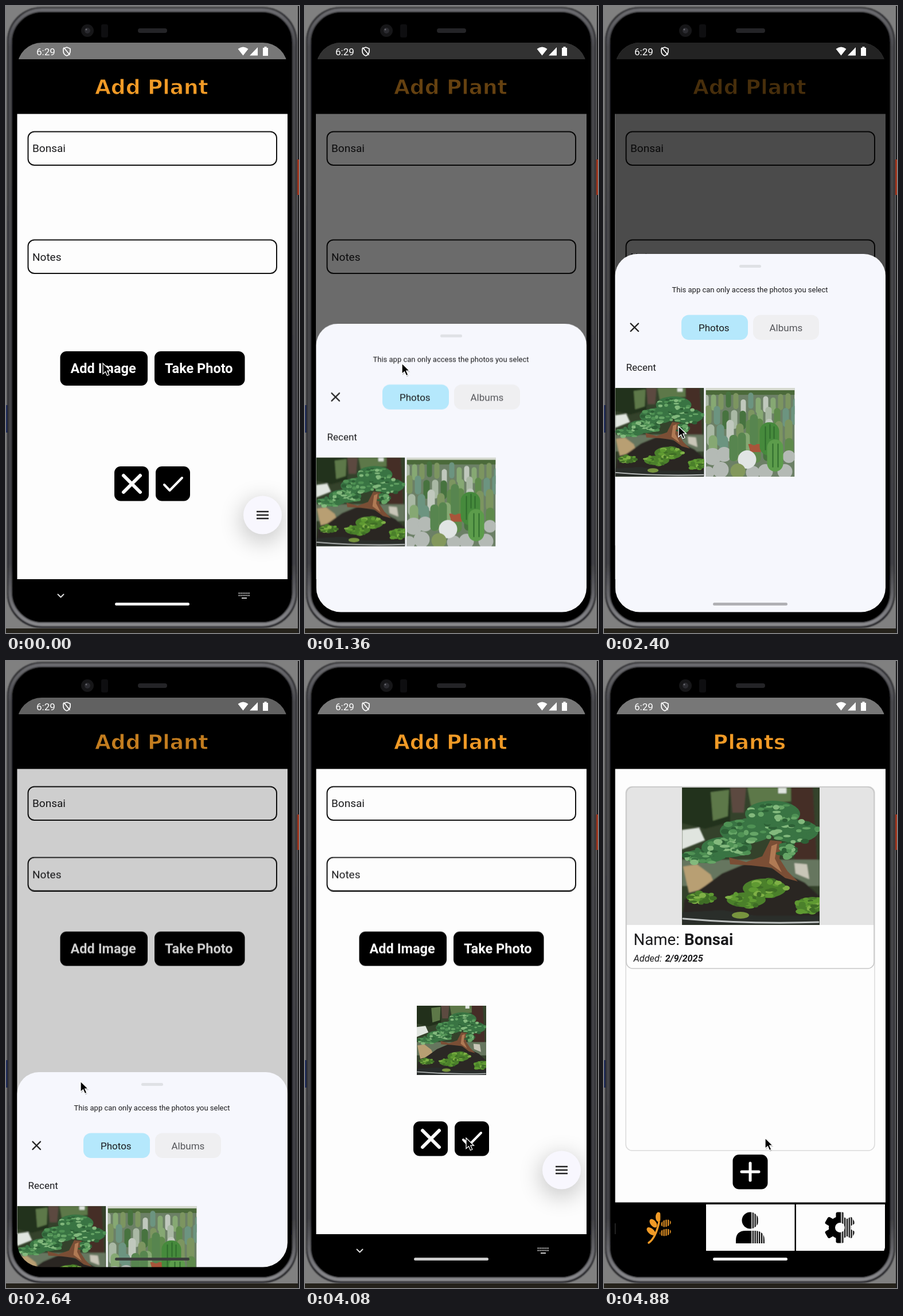
Animation, 511 px wide and 1095 px high, one loop 4960 ms. Source, as an HTML page:

```html
<!DOCTYPE html>
<html lang="en">
<head>
<meta charset="utf-8">
<title>Add a plant</title>
<style>
html, body { margin: 0; width: 100%; height: 100%; overflow: hidden; background: #808080; }
svg.stage { display: block; width: 511px; height: 1095px; }
text { font-family: Roboto, sans-serif; font-size: 19px; fill: #1b1b1d; }
.title { font: bold 36px "DejaVu Sans", sans-serif; fill: #f09a26; stroke: #000; stroke-width: 1px; }
.button { font-size: 23.5px; font-weight: 700; fill: #fff; }
.small { font-size: 13px; }
.mid { font-size: 17px; }
.large { font-size: 27.7px; }
.bold { font-weight: 700; }
.italic { font-style: italic; font-size: 16.3px; }
.white { fill: #fff; }
.grey { fill: #55565a; }
.field { fill: #fdfdfd; stroke: #111; stroke-width: 2; }
.line { fill: none; stroke-linecap: round; stroke-linejoin: round; }

.cursor, .sheet, .dim, .pill, .notes, .buttons, .picked, .form, .list, .cardphoto { animation: 4960ms linear infinite; }

.cursor { animation-name: cursor; }
@keyframes cursor {
  0%, 30.6% { transform: translate(169px, 624px); animation-timing-function: ease-in-out; }
  38.71% { transform: translate(188px, 692px); animation-timing-function: ease-out; }
  45%, 56.5% { transform: translate(130px, 734px); animation-timing-function: ease-in-out; }
  66.13% { transform: translate(174px, 777px); animation-timing-function: ease-in-out; }
  77.42%, 100% { transform: translate(281px, 833px); }
}
.sheet { animation-name: sheet; }
@keyframes sheet {
  0%, 24.15% { transform: translateY(628px); animation-timing-function: cubic-bezier(0, 0, .2, 1); }
  31.34%, 50.32% { transform: translateY(0); }
  56.77%, 100% { transform: translateY(628px); }
}
.dim { animation-name: dim; }
@keyframes dim {
  0%, 24.15% { opacity: 0; animation-timing-function: cubic-bezier(0, 0, .2, 1); }
  31%, 50% { opacity: .7; }
  54.44%, 100% { opacity: 0; }
}
.pill { animation-name: pill; animation-timing-function: step-end; }
@keyframes pill {
  0% { fill: #f2f2f2; }
  24.19% { fill: #f6f7fd00; }
  30.6% { fill: #b0b0b4; }
  50.3% { fill: #3c3f3c; }
  56.4% { fill: #cbcbcb; }
  83.06%, 100% { fill: #f6f6f6; }
}
.notes { animation-name: notes; animation-timing-function: step-end; }
@keyframes notes { 0% { transform: none; } 49.19%, 100% { transform: translateY(-65.5px); } }
.buttons { animation-name: buttons; animation-timing-function: step-end; }
@keyframes buttons { 0% { transform: none; } 49.19%, 100% { transform: translateY(-130.5px); } }
.picked { animation-name: picked; }
@keyframes picked { 0%, 54.84% { opacity: 0; } 60.89%, 100% { opacity: 1; } }
.form { animation-name: form; animation-timing-function: step-end; }
@keyframes form { 0% { visibility: visible; } 83.06%, 100% { visibility: hidden; } }
.list { animation-name: list; animation-timing-function: step-end; }
@keyframes list { 0% { visibility: hidden; } 83.06%, 100% { visibility: visible; } }
.cardphoto { animation-name: cardphoto; }
@keyframes cardphoto { 0%, 83.57% { opacity: 0; } 89.62%, 100% { opacity: 1; } }
</style>
</head>
<body>
<svg class="stage" viewBox="0 0 511 1095">
  <defs>
    <clipPath id="screen"><rect x="19.500" y="64" width="471.500" height="994.500" rx="43"/></clipPath>
    <linearGradient id="rim" x2="0" y2="1">
      <stop offset="0" stop-color="#6c6c70"/><stop offset=".06" stop-color="#4a4a4e"/>
      <stop offset=".9" stop-color="#424246"/><stop offset="1" stop-color="#8a8a8e"/>
    </linearGradient>
    <filter id="blend"><feGaussianBlur stdDeviation="1.300"/></filter>
    <filter id="soft" x="-60%" y="-60%" width="220%" height="220%"><feGaussianBlur stdDeviation="19"/></filter>
    <pattern id="bars" width="3.800" height="10" patternUnits="userSpaceOnUse">
      <rect width="2.200" height="10" fill="#fff"/>
    </pattern>
    <mask id="half" maskUnits="userSpaceOnUse" x="-32" y="-32" width="64" height="64">
      <rect x="-32" y="-32" width="33" height="64" fill="#fff"/>
      <rect x="1" y="-32" width="31" height="64" fill="url(#bars)"/>
    </mask>

    <symbol id="bonsai" viewBox="0 0 240 240">
      <path fill="#34422b" d="M0 0H240V240H0Z"/>
      <g filter="url(#blend)">
        <path fill="#22301b" d="M0 0H84V60L40 72 0 62Z"/>
        <path fill="#5d7848" d="M50 8 82 4 80 50 54 58ZM114 0H190V24L120 32Z"/>
        <path fill="#5c4a40" d="M84 0H112L108 44H88Z"/>
        <path fill="#452d27" d="M190 0H228L236 140H196Z"/>
        <path fill="#e0e5df" d="M0 74 30 70 40 92 0 108ZM168 0h14v10h-14Z"/>
        <path fill="#66765e" d="M0 126H240V172H0Z"/>
        <path fill="#c9c6b8" d="M196 132 218 134 222 160 198 150Z"/>
        <path fill="#b89f73" d="M2 138 26 134 50 152 58 172 12 184Z"/>
        <path fill="#2b2824" d="M4 196 40 172 70 150 118 130 164 142 214 166 240 190V234H0Z"/>
        <path fill="#292d2c" d="M0 218 70 214 130 224 240 224V240H0Z"/>
      </g>
      <g id="moss"></g>
      <path fill="#7a4e35" d="M82 122 112 130 140 120 154 92 174 94 170 124 184 146 202 164 180 158 156 140 120 136 84 134Z"/>
      <path fill="#b07a54" d="M156 102 166 98 162 124 174 148 152 132Z"/>
      <g id="leaves"></g>
      <ellipse cx="102" cy="223" rx="15" ry="6" fill="#77943e"/>
      <path class="line" stroke="#bfc3c2" stroke-width="3" d="M2 229Q120 239 238 235"/>
    </symbol>

    <symbol id="cacti" viewBox="0 0 155 155">
      <path fill="#6c8066" d="M0 0H155V155H0Z"/>
      <path fill="#d5d9cf" d="M0 0H155V4H0Z"/>
      <path fill="#4b6a3a" d="M0 4H155V12H0Z"/>
      <g id="columns"></g>
      <path fill="#a8553a" d="M74 98H96V112H78Z"/>
      <g fill="#b4bab5">
        <circle cx="12" cy="120" r="15"/><circle cx="32" cy="116" r="13"/><circle cx="104" cy="146" r="13"/>
        <circle cx="26" cy="143" r="14"/><circle cx="145" cy="120" r="11"/><circle cx="138" cy="146" r="13"/>
        <circle cx="4" cy="148" r="11"/><circle cx="82" cy="148" r="12"/>
      </g>
      <g fill="#57854f">
        <rect x="41" y="82" width="15" height="46" rx="7"/><rect x="56" y="78" width="14" height="42" rx="7"/>
        <rect x="77" y="46" width="14" height="54" rx="7"/>
      </g>
      <circle cx="72" cy="125" r="16" fill="#e1e5e4"/>
      <circle cx="56" cy="145" r="13" fill="#83985c"/>
      <rect x="94" y="60" width="34" height="58" rx="16" fill="#468a3c"/>
      <rect x="107" y="90" width="28" height="56" rx="14" fill="#5c9c4b"/>
      <path class="line" stroke="#2f6a2c" stroke-width="2" d="M104 68V108M112 64V88M119 68V88M117 98V138M126 98V138"/>
    </symbol>
  </defs>

  <!-- phone body -->
  <rect width="511" height="1095" fill="#808080"/>
  <rect y="1087" width="511" height="8" fill="#24211a"/>
  <rect x="509" width="2" height="1095" fill="#1b1b1d"/>
  <rect x="507.500" y="268" width="3.500" height="62" fill="#a83a20"/>
  <rect y="697" width="4" height="48" fill="#26366e"/>
  <g filter="url(#blend)">
    <rect x="2" y="2" width="505.500" height="1084" rx="60" fill="#18181a"/>
    <rect x="7" y="7" width="495.500" height="1073" rx="56" fill="#030304" stroke="url(#rim)" stroke-width="6"/>
    <rect x="12" y="11" width="486" height="1066" rx="52" fill="#020203"/>
  </g>
  <circle cx="142" cy="43" r="11" fill="#161618"/>
  <circle cx="142" cy="43" r="5" fill="#2b2b30"/>
  <circle cx="140" cy="41" r="1.500" fill="#66666c"/>
  <rect x="166" y="32" width="12" height="23" rx="3" fill="#0e0e10"/>
  <rect x="230" y="39" width="51" height="8" rx="4" fill="#242427"/>

  <g clip-path="url(#screen)">
    <rect x="19" y="64" width="473" height="995" fill="#000"/>
    <rect x="19" y="64" width="473" height="29" fill="#777"/>
    <rect x="19" y="188.500" width="473" height="812.500" fill="#fdfdfd"/>

    <g class="form">
      <text class="title" x="155" y="153.500">Add Plant</text>
      <rect class="field" x="38.500" y="219.500" width="433.500" height="58.500" rx="11"/>
      <text x="46" y="255">Bonsai</text>
      <g class="notes">
        <rect class="field" x="38.500" y="408.500" width="433.500" height="58.500" rx="11"/>
        <text x="46" y="444.500">Notes</text>
      </g>
      <g class="buttons">
        <rect x="94.500" y="603" width="152.500" height="60" rx="11"/>
        <rect x="259" y="603" width="157.500" height="60" rx="11"/>
        <text class="button" x="112.500" y="641">Add Image</text>
        <text class="button" x="277" y="641">Take Photo</text>
      </g>
      <use class="picked" href="#bonsai" x="195" y="602" width="121" height="121"/>
      <rect x="189" y="804" width="60" height="60.500" rx="11"/>
      <rect x="261" y="804" width="60" height="60.500" rx="11"/>
      <path class="line" stroke="#fff" stroke-width="6" d="M205 820 234 849M234 820 205 849"/>
      <path class="line" stroke="#fff" stroke-width="4" d="M276 836 285.500 846 307 824"/>
      <circle cx="447" cy="899" r="38" fill="#000" opacity=".2" filter="url(#soft)"/>
      <circle cx="447.500" cy="889" r="33.500" fill="#f8f7fe"/>
      <path stroke="#222" stroke-width="2.400" d="M437 883H458M437 889H458M437 895H458"/>
      <path class="line" stroke="#ddd" stroke-width="2" d="M90.500 1027.500 95.500 1032.500 100.500 1027.500"/>
      <path stroke="#ccc" stroke-width="2.200" stroke-dasharray="2.200 1.200" d="M405.500 1025.500H426M405.500 1029.500H426"/>
      <path stroke="#ccc" stroke-width="2" d="M411 1034H420"/>
    </g>

    <g class="list">
      <text class="title" x="190" y="153.500">Plants</text>
      <rect x="38" y="219.500" width="434" height="635.500" rx="11" fill="#fdfdfd" stroke="#dadada" stroke-width="1.500"/>
      <rect x="39" y="220" width="432" height="317" rx="11" fill="#fefefe"/>
      <path fill="#e4e4e4" d="M39 461V231a11 11 0 0 1 11-11H460a11 11 0 0 1 11 11V461Z"/>
      <use class="cardphoto" href="#bonsai" x="136" y="221" width="240" height="240"/>
      <rect x="39" y="220" width="432" height="317" rx="11" fill="none" stroke="#c6c6c6" stroke-width="1.500"/>
      <text class="large" x="51.500" y="496">Name:</text>
      <text class="large bold" x="140" y="496">Bonsai</text>
      <text class="italic" x="51.500" y="525">Added:</text>
      <text class="italic bold" x="106.500" y="525">2/9/2025</text>
      <rect x="224.500" y="862" width="61" height="60.500" rx="11"/>
      <path class="line" stroke="#fff" stroke-width="5" d="M240 892H270M255 877V907"/>
      <rect x="19" y="945.500" width="473" height="113" fill="#000"/>
      <rect x="178" y="949" width="154.500" height="81" fill="#fdfdfd"/>
      <rect x="335" y="949" width="155" height="81" fill="#fdfdfd"/>
      <g transform="translate(96 990)" mask="url(#half)" fill="#f09a26">
        <path class="line" stroke="#f09a26" stroke-width="3.500" d="M-18 26Q-6 18 0 -10"/>
        <ellipse cx="-1" cy="-19" rx="5" ry="8.500"/>
        <ellipse cx="-10" cy="-8" rx="5" ry="8.500" transform="rotate(-38 -10 -8)"/>
        <ellipse cx="-14" cy="6" rx="5" ry="9" transform="rotate(-50 -14 6)"/>
        <ellipse cx="12" cy="-8" rx="9" ry="6" transform="rotate(-20 12 -8)"/>
        <ellipse cx="11" cy="8" rx="10" ry="6" transform="rotate(-14 11 8)"/>
      </g>
      <g transform="translate(255 990)" mask="url(#half)">
        <circle cy="-13" r="14.500"/>
        <path d="M-25 27V22Q-25 5 -8 5H8Q25 5 25 22V27Z"/>
      </g>
      <g transform="translate(411.500 989.500)" mask="url(#half)">
        <circle r="14" fill="none" stroke="#000" stroke-width="11"/>
        <g id="teeth"></g>
      </g>
    </g>

    <rect class="dim" x="19" y="64" width="473" height="995"/>

    <g class="white">
      <text class="mid white" x="53" y="85.500">6:29</text>
      <path class="line" stroke="#fff" stroke-width="1.700" d="M106 72 112 74.500V79Q112 84.500 106 87 100 84.500 100 79V74.500ZM101 73 111 85"/>
      <path d="M404.500 75Q413.500 68 422.500 75L413.500 86.500ZM425 86.500 439 72V86.500ZM448 73h2.500v-2h4v2H457V87H448Z"/>
    </g>

    <g class="sheet">
      <rect x="19.500" y="433" width="471.500" height="680" rx="38" fill="#f6f7fd"/>
      <rect x="236" y="452" width="38" height="5" rx="2.500" fill="#dfe1e5"/>
      <text class="small" x="118.500" y="500">This app can only access the photos you select</text>
      <path class="line" stroke="#222" stroke-width="2.400" d="M46.500 554.500 60 568M60 554.500 46.500 568"/>
      <rect x="135" y="539.500" width="116" height="43.500" rx="13" fill="#b5e8fc"/>
      <rect x="260" y="539.500" width="115" height="43.500" rx="13" fill="#efeff1"/>
      <text class="mid" x="165" y="567.500">Photos</text>
      <text class="mid grey" x="288.500" y="567.500">Albums</text>
      <text class="mid" x="38.500" y="637">Recent</text>
      <use href="#bonsai" x="19.500" y="667" width="155" height="155"/>
      <use href="#cacti" x="177.500" y="667" width="155" height="155"/>
    </g>
    <rect class="pill" x="190" y="1042" width="130" height="5" rx="2.500"/>
  </g>

  <g class="cursor">
    <path d="M0 0V18.500L4.500 14.500 7.500 21.500 10.800 20 7.800 13.200H13.500Z" opacity=".2" transform="translate(1 2)"/>
    <path d="M0 0V18.500L4.500 14.500 7.500 21.500 10.800 20 7.800 13.200H13.500Z" stroke="#fff" stroke-width="1.300"/>
  </g>
</svg>
<script>
const add = (id, tag, attrs) => {
  const el = document.createElementNS('http://www.w3.org/2000/svg', tag);
  for (const key in attrs) el.setAttribute(key, attrs[key]);
  document.getElementById(id).append(el);
};

let seed = 11;
const random = () => (seed = seed * 16807 % 2147483647) / 2147483647;
const pick = list => list[Math.floor(random() * list.length)];

// A soft-edged mound: a base ellipse covered with small round tufts
const mound = (id, colors, cx, cy, rx, ry) => {
  add(id, 'ellipse', { cx, cy, rx, ry, fill: colors[0] });
  for (let i = 0; i < 26; i++) {
    const angle = random() * Math.PI * 2, reach = Math.sqrt(random());
    add(id, 'ellipse', {
      cx: cx + Math.cos(angle) * rx * reach, cy: cy + Math.sin(angle) * ry * reach,
      rx: 4 + random() * 5, ry: 2 + random() * 3, fill: pick(colors)
    });
  }
};

const leaf = ['#397443', '#4f9154', '#66a566', '#83b97d', '#2d6036'];
mound('leaves', leaf, 185, 110, 14, 13);
mound('leaves', leaf, 38, 120, 36, 12);
mound('leaves', leaf, 78, 104, 44, 18);
mound('leaves', leaf, 112, 76, 46, 21);
mound('leaves', leaf, 196, 76, 42, 20);
mound('leaves', leaf, 158, 46, 48, 23);

const moss = ['#4b802b', '#5f9a32', '#7fb046', '#3f6d26'];
mound('moss', moss, 144, 176, 38, 17);
mound('moss', moss, 112, 196, 34, 13);
mound('moss', moss, 222, 206, 24, 14);
mound('moss', moss, 32, 192, 24, 9);

// Rows of rounded columns, larger towards the front
const greens = ['#5f8a4c', '#86a873', '#47733f', '#a9b8a4', '#7c9560', '#6c9480', '#c0c8bd'];
for (let row = 0; row < 4; row++) {
  const width = 9 + row * 2;
  for (let x = -4 + row * 3; x < 155; x += width + 4) {
    add('columns', 'rect', {
      x, y: 6 + row * 23 + random() * 14, width, height: 28 + row * 5,
      rx: width / 2, fill: pick(greens)
    });
  }
}

for (let angle = 0; angle < 360; angle += 60) {
  add('teeth', 'rect', { x: -7, y: -27, width: 14, height: 13, rx: 3, transform: `rotate(${angle})` });
}
</script>
</body>
</html>
```
